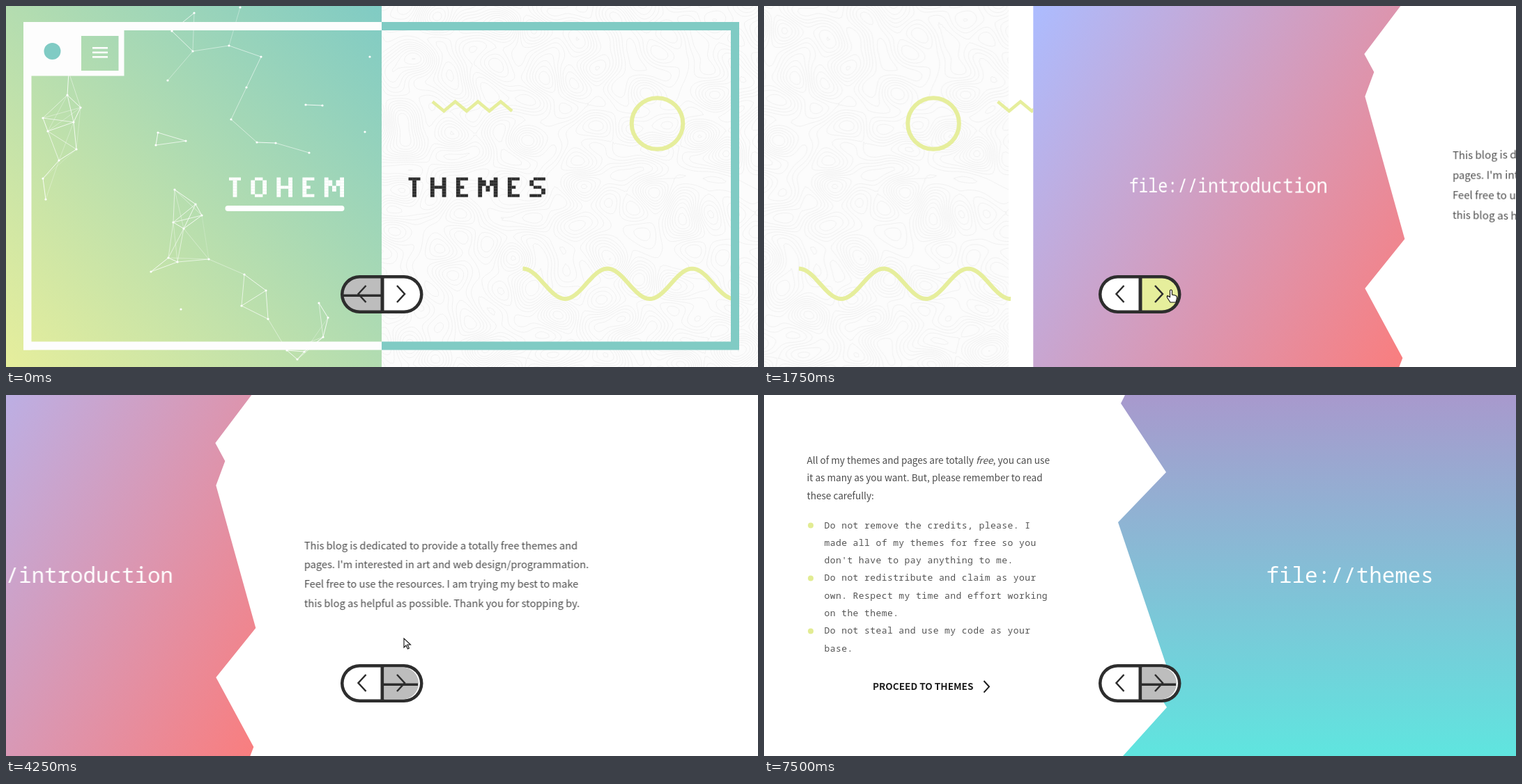
An HTML page with a canvas for the animation above (7.75 s loop, 1079 by 519 pixels).

```html
<!DOCTYPE html>
<html lang="en">
<head>
<meta charset="utf-8">
<title>Theme blog</title>
<style>
html, body { margin: 0; width: 100%; height: 100%; overflow: hidden; background: #fff; }
canvas, svg { position: absolute; left: 0; top: 0; width: 1079px; height: 519px; }
svg { transform-origin: 539.5px 259.5px; }
text { white-space: pre; }
.title { font: 500 30.8px 'Roboto Mono', 'Noto Sans Mono', monospace; fill: #fff; }
.body { font: 14.65px 'Noto Sans CJK JP', 'Noto Sans CJK SC', 'Noto Sans CJK', 'Open Sans', sans-serif; fill: #4d4d4d; }
.small { font-size: 13.62px; }
.list { font: 13px 'Roboto Mono', 'Noto Sans Mono', monospace; letter-spacing: .42px; fill: #555; }
.more { font-size: 13.6px; font-weight: 700; fill: #1c1c1c; }
.chev { fill: none; stroke: #1c1c1c; stroke-width: 2; }
.hover .more { fill: #56aaa0; }
.hover .chev { stroke: #56aaa0; }
</style>
</head>
<body>
<canvas id="back" width="1079" height="519"></canvas>
<svg id="intro"></svg>
<svg id="themes"></svg>
<canvas id="front" width="1079" height="519"></canvas>
<script>
const W = 1079, H = 519, MID = 539, LOOP = 7750, STEP = 250;
const TEAL = '#80cbc4', LIME = '#e6ee9c', INK = '#2d2d2d';
const $ = id => document.getElementById(id);
const bg = $('back').getContext('2d'), fg = $('front').getContext('2d');

let seed = 11;
const rnd = () => (seed = seed * 16807 % 2147483647) / 2147483647;
rnd(); rnd();

// ---- text pages
const lines = (rows, x, y, gap, cls) =>
  rows.map((s, i) => `<text class="${cls}" x="${x}" y="${y + i * gap}">${s}</text>`).join('');

$('intro').innerHTML = lines(['file://introduction'], 63.5, 269.5, 0, 'title') + lines([
  'This blog is dedicated to provide a totally free themes and',
  "pages. I'm interested in art and web design/programmation.",
  'Feel free to use the resources. I am trying my best to make',
  'this blog as helpful as possible. Thank you for stopping by.'], 602.5, 221.5, 27.7, 'body');

$('themes').innerHTML = lines(['file://themes'], 720.5, 269.5, 0, 'title') + lines([
  'All of my themes and pages are totally <tspan font-style="italic">free</tspan>, you can use',
  'it as many as you want. But, please remember to read',
  'these carefully:'], 61.5, 99, 25.3, 'body small') + lines([
  'Do not remove the credits, please. I',
  'made all of my themes for free so you',
  "don't have to pay anything to me.",
  'Do not redistribute and claim as your',
  'own. Respect my time and effort working',
  'on the theme.',
  'Do not steal and use my code as your',
  'base.'], 86.5, 191.5, 25.3, 'list') +
  [187.5, 263.5, 339.5].map(y => `<circle cx="67" cy="${y}" r="4" fill="#e2ec93"/>`).join('') +
  '<text class="body more" id="more" x="156" y="424.3">PROCEED TO THEMES</text>' +
  '<path class="chev" id="chev" d="M315.5 411l7.5 8.3-7.5 8.3"/>';

// ---- contour map, built once
const map = document.createElement('canvas');
map.width = W - MID; map.height = H;
(function drawMap() {
  const c = map.getContext('2d'), cell = 4, gap = 1.1;
  const waves = Array.from({ length: 14 }, () => {
    const a = rnd() * Math.PI * 2, k = Math.PI * 2 / (50 + rnd() * 90);
    return { u: k * Math.cos(a), v: k * Math.sin(a), p: rnd() * 6.28 };
  });
  const field = (x, y) => waves.reduce((s, w) => s + Math.sin(w.u * x + w.v * y + w.p), 0);
  const tri = pts => {
    const z = pts.map(p => p[2]), hi = Math.max(...z);
    for (let l = Math.ceil(Math.min(...z) / gap) * gap; l < hi; l += gap) {
      const hit = [];
      pts.forEach((a, i) => {
        const b = pts[(i + 1) % 3];
        if ((a[2] < l) === (b[2] < l)) return;
        const f = (l - a[2]) / (b[2] - a[2]);
        hit.push([a[0] + f * (b[0] - a[0]), a[1] + f * (b[1] - a[1])]);
      });
      if (hit.length === 2) { c.moveTo(...hit[0]); c.lineTo(...hit[1]); }
    }
  };
  c.fillStyle = '#fcfcfc';
  c.fillRect(0, 0, W, H);
  c.beginPath();
  const at = (x, y) => [x, y, field(x, y)];
  for (let y = 0; y < H; y += cell) for (let x = 0; x < W - MID; x += cell) {
    const a = at(x, y), b = at(x + cell, y), d = at(x, y + cell), e = at(x + cell, y + cell);
    tri([a, b, d]); tri([b, e, d]);
  }
  c.strokeStyle = '#ebebeb';
  c.lineWidth = 0.65;
  c.stroke();
})();

// ---- drifting stars
const spots = [270,10, 238,36, 268,65, 320,57, 366,73, 336,2, 232,107, 345,117, 323,163, 360,196,
  387,197, 435,211, 430,142, 454,143, 522,73, 515,181, 88,128, 53,161, 97,167, 107,146, 60,180,
  101,206, 76,222, 53,248, 57,278, 218,182, 258,194, 215,200, 242,264, 272,285, 281,301, 255,320,
  240,311, 233,362, 208,382, 246,368, 291,364, 342,386, 373,409, 338,431, 376,450, 449,427,
  462,448, 455,476, 251,436, 403,495, 418,508, 428,497, 90,95];
const stars = [];
for (let i = 0; i < spots.length; i += 2) {
  const x = spots[i], y = spots[i + 1];
  stars.push({ x, y, vx: (rnd() - 0.3) * 14, vy: (rnd() - 0.5) * 14 - (x < 120 ? 16 : 0) });
}

function drawStars(t) {
  const reach = 64, p = stars.map(s => [s.x + s.vx * t / 1000, s.y + s.vy * t / 1000]);
  bg.strokeStyle = bg.fillStyle = '#fff';
  bg.lineWidth = 1;
  p.forEach((a, i) => {
    for (const b of p.slice(i + 1)) {
      const d = Math.hypot(a[0] - b[0], a[1] - b[1]);
      if (d > reach) continue;
      bg.globalAlpha = Math.min(0.85, 1.5 * (1 - d / reach) + 0.2);
      path(bg, [a, b]);
      bg.stroke();
    }
    bg.globalAlpha = 1;
    disc(bg, a[0], a[1], 1.6);
    bg.fill();
  });
}

// ---- drawing helpers
function path(c, pts) {
  c.beginPath();
  pts.forEach(p => c.lineTo(...p));
}
function disc(c, x, y, r) {
  c.beginPath();
  c.arc(x, y, r, 0, 7);
}
function box(c, x, y, w, h, r, color) {
  c.beginPath();
  c.roundRect(x, y, w, h, r);
  c.fillStyle = color;
  c.fill();
}
function layer(dx, draw) {
  bg.save();
  bg.translate(dx, 0);
  draw();
  bg.restore();
}
function blend(x0, y0, x1, y1, from, to) {
  const g = bg.createLinearGradient(x0, y0, x1, y1);
  g.addColorStop(0, from);
  g.addColorStop(1, to);
  return g;
}

// Pixel letters: columns, then one base-32 digit per row
const glyphs = { T: [3, '7222222'], O: [4, '6999996'], H: [4, '999f999'],
  E: [3, '7446447'], M: [5, 'hrrllhh'], S: [4, '788611e'] };
function pixelText(word, x, y, color) {
  const w = 5.6, h = 4;
  bg.fillStyle = color;
  for (const ch of word) {
    const [cols, rows] = glyphs[ch];
    [...rows].forEach((d, r) => {
      for (let c = 0; c < cols; c++)
        if (parseInt(d, 32) >> (cols - 1 - c) & 1) bg.fillRect(x + c * w, y + r * h, w + 0.2, h + 0.2);
    });
    x += cols * w + 14.6;
  }
}

// ---- pages
function drawHome(s, t) {
  layer(-s, () => {
    bg.drawImage(map, MID, 0);
    bg.save();
    bg.beginPath();
    bg.rect(0, 0, MID, H);
    bg.clip();
    bg.fillStyle = blend(5, 524, 534, -5, LIME, TEAL);
    bg.fillRect(0, 0, MID, H);
    drawStars(t);
    bg.restore();
  });

  bg.strokeStyle = LIME;
  layer(-s * 0.38, () => {
    bg.lineWidth = 4.5;
    path(bg, Array.from({ length: 8 }, (_, i) => [612 + i * 16.3, i % 2 ? 151 : 137.5]));
    bg.stroke();
  });
  layer(-s * 0.95, () => {
    bg.lineWidth = 6;
    disc(bg, 934.5, 169, 36.8);
    bg.stroke();
    bg.beginPath();
    for (let x = 741.5; x <= 1046; x += 2) bg.lineTo(x, 399.3 - 21.7 * Math.cos((x - 741.5) / 121.5 * Math.PI * 2));
    bg.stroke();
  });

  layer(-s * 2, () => {
    bg.fillStyle = TEAL;
    bg.beginPath();
    bg.rect(MID, 23, 513, 471.5);
    bg.rect(MID, 35, 501, 447.5);
    bg.fill('evenodd');
    bg.fillStyle = '#fdfdfd';
    bg.fillRect(25, 23, 514, 12);
    bg.fillRect(25, 482.5, 514, 12);
    bg.fillRect(25, 23, 11.5, 471.5);
    bg.beginPath();
    bg.rect(25, 23, 144.5, 77.5);
    bg.rect(108, 43, 53.5, 50);
    bg.fill('evenodd');
    for (const y of [59, 65.5, 72]) bg.fillRect(124, y, 22, 2.6);
    bg.fillStyle = TEAL;
    disc(bg, 66.5, 65, 12);
    bg.fill();
  });

  layer(-s * 2.95, () => {
    pixelText('TOHEM', 320, 246.5, '#fff');
    pixelText('THEMES', 577.5, 246.5, INK);
    box(bg, 314.5, 287, 171, 8, 4, '#fff');
  });
}

function panel(x, pts, fill) {
  layer(x, () => {
    bg.fillStyle = '#fff';
    bg.fillRect(0, 0, W, H);
    path(bg, pts);
    bg.fillStyle = fill;
    bg.fill();
  });
}
const drawIntro = x => panel(x, [[0, 0], [527, 0], [475, 69], [489, 95], [476, 130], [533, 335],
  [476, 406], [530, 506], [525, 519], [0, 519]], blend(-45, 78, 584, 441, '#acbcff', '#fa7d7d'));
const drawThemes = x => panel(x, [[518, 0], [512, 12], [577, 111], [508, 183], [577, 388], [561, 423],
  [578, 449], [515, 519], [W, H], [W, 0]], blend(0, 0, 0, H, '#a899cd', '#5fe5df'));

// Text turns like a door while its page slides in
function place(el, x) {
  el.style.display = Math.abs(x) < W ? '' : 'none';
  const turn = -40 * Math.max(0, x) / W;
  el.style.transform = x ? `translateX(${x}px) perspective(800px) rotateY(${turn}deg)` : 'none';
}

// ---- switch, cursor, status bar
function drawSwitch(t) {
  const off = '#bdbdbd', leftOff = t < 1750, rightOff = t >= 4000;
  const hot = t < 1500 ? '#fff' : t < 1750 ? '#eff4bf' : '#e6ee9c';
  box(fg, 480, 387, 118.5, 55, 27.5, INK);
  box(fg, 484.5, 391.5, 53, 46, [23, 0, 0, 23], leftOff ? off : '#fff');
  box(fg, 542.5, 391.5, 51.5, 46, [0, 23, 23, 0], rightOff ? '#fff' : hot);
  if (rightOff) box(fg, 542.5, 391.5, 49.5, 46, [0, 23, 23, 0], off);
  fg.fillStyle = INK;
  if (leftOff) fg.fillRect(484, 414.5, 54, 3.5);
  if (rightOff) fg.fillRect(542, 414.5, 49, 3.5);
  fg.strokeStyle = INK;
  fg.lineWidth = 2.5;
  path(fg, [[516.5, 402], [505.5, 414], [516.5, 426]]);
  fg.stroke();
  path(fg, [[561, 402], [572, 414], [561, 426]]);
  fg.stroke();
}

const shapes = {
  arrow: new Path2D('M0 0v13l3-3 2.4 5 2-1-2.4-5h4.5z'),
  hand: new Path2D('M-1.5 1q1.5-2 3 0v6l4.5 1q3 1 2.5 4l-1.5 6h-8l-4-6q-1.5-2.5 0-3.5l3.5 2z')
};
// Start time, shape, hot spot
const moves = [
  [0], [750, 'arrow', 640, 498], [1000, 'arrow', 630, 455], [1250, 'arrow', 601, 424],
  [1500, 'hand', 584, 408], [3000, 'hand', 582, 411], [3250, 'hand', 579, 414],
  [3500, 'hand', 576, 418], [3750, 'hand', 574, 420], [4000, 'stop', 574, 427],
  [4250, 'arrow', 571, 350], [4500, 'arrow', 568, 285], [5250, 'arrow', 530, 310],
  [5500, 'arrow', 430, 365], [5750, 'arrow', 325, 412], [6000, 'hand', 284, 428],
  [6500, 'arrow', 340, 395], [6750, 'arrow', 480, 300], [7000, 'arrow', 700, 170],
  [7250, 'arrow', 950, 50], [7500]
];
function drawCursor(t) {
  const [, kind, x, y] = moves.filter(m => m[0] <= t).pop();
  if (!kind) return;
  fg.save();
  fg.translate(x, y);
  if (kind === 'stop') {
    disc(fg, 0, 0, 5.5);
    fg.fillStyle = '#fff';
    fg.fill();
    fg.strokeStyle = '#b3141f';
    fg.lineWidth = 2;
    fg.stroke();
    path(fg, [[-4, -4], [4, 4]]);
    fg.stroke();
  } else {
    fg.fillStyle = '#fff';
    fg.strokeStyle = '#111';
    fg.lineWidth = 1.1;
    fg.fill(shapes[kind]);
    fg.stroke(shapes[kind]);
  }
  fg.restore();
}

function drawStatus() {
  box(fg, -5, 503, 363, 25, 4, '#c8c8c8');
  box(fg, -5, 504, 362, 25, 3, '#f2f2f2');
  fg.fillStyle = '#666';
  fg.font = "10.4px 'Open Sans', 'Noto Sans', sans-serif";
  fg.fillText('127.0.0.1:50606/tagged/themes', 1, 516);
}

// ---- timeline
function slide(t, start) {
  const u = Math.min(1, Math.max(0, (t - start) / 600));
  return u < 0.5 ? 4 * u ** 3 : 1 - 4 * (1 - u) ** 3;
}

let shown = -1;
function render(t) {
  // The next page starts a little beyond the right edge
  const first = slide(t, 1410), second = slide(t, 4044), reach = W * 1.1;
  const introX = (1 - first) * reach - second * W, themesX = (1 - second) * reach;
  bg.fillStyle = '#fff';
  bg.fillRect(0, 0, W, H);
  if (first < 1) drawHome(first * W, t);
  if (Math.abs(introX) < W) drawIntro(introX);
  if (themesX < W) drawThemes(themesX);
  place($('intro'), introX);
  place($('themes'), themesX);

  const hover = t >= 6000 && t < 6500;
  $('themes').classList.toggle('hover', hover);
  $('more').setAttribute('x', hover ? 149 : 156);
  $('chev').setAttribute('transform', `translate(${hover ? 6 : 0})`);

  fg.clearRect(0, 0, W, H);
  drawSwitch(t);
  if (hover) drawStatus();
  drawCursor(t);
}

const began = performance.now();
function tick() {
  const t = Math.floor((performance.now() - began) % LOOP / STEP) * STEP;
  if (t !== shown) render(shown = t);
  requestAnimationFrame(tick);
}
tick();
</script>
</body>
</html>
```
